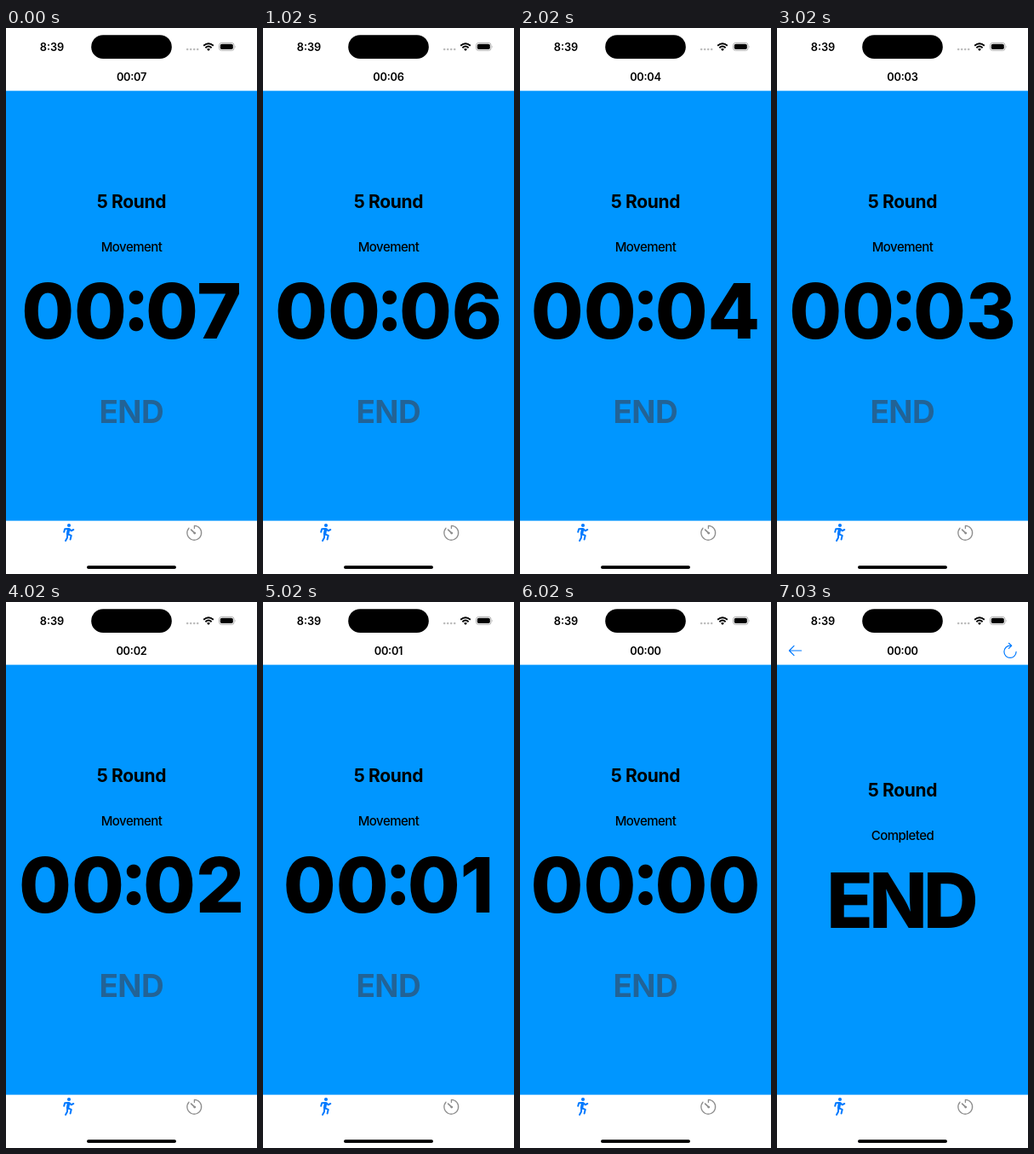
Animation of 295 by 640 pixels, one loop 8.25 s. Source, as an HTML page:

```html
<!DOCTYPE html>
<html lang="en">
<head>
<meta charset="utf-8">
<title>Round timer</title>
<style>
  html, body { margin: 0; width: 100%; height: 100%; overflow: hidden; background: #fff; }
  svg { display: block; width: 295px; height: 640px; }
  text { font-family: Inter, "Liberation Sans", sans-serif; text-anchor: middle; fill: #000; }
  .bar { font-size: 12.8px; font-weight: 600; }
  #title { letter-spacing: -.02em; font-feature-settings: "calt"; }
  .round { font-size: 21px; font-weight: 700; letter-spacing: -.016em; }
  .phase { font-size: 15px; font-weight: 500; letter-spacing: -.035em; }
  .big { font-size: 89.5px; font-weight: 800; }
  .tight { letter-spacing: -.053em; font-feature-settings: "case"; }
  .next { font-size: 37px; font-weight: 700; letter-spacing: -.015em; fill: #226396; }
  .line { fill: none; stroke-linecap: round; stroke-linejoin: round; }
  .blue { stroke: #007aff; }
</style>
</head>
<body>
<svg viewBox="0 0 295 640">
  <rect width="295" height="640" fill="#fff"/>
  <rect y="73.6" width="295" height="504" fill="#0096ff"/>

  <!-- status bar -->
  <text class="bar" x="54" y="26.6">8:39</text>
  <rect x="100.2" y="8.3" width="94.6" height="27.8" rx="13.9"/>
  <g fill="#bdbdbd">
    <circle cx="213.2" cy="25" r="1.3"/><circle cx="217.2" cy="25" r="1.3"/>
    <circle cx="221.2" cy="25" r="1.3"/><circle cx="225.2" cy="25" r="1.3"/>
  </g>
  <g class="line" stroke="#000" stroke-width="1.9" style="stroke-linecap:butt">
    <path d="M232.2 20.8Q238 15.6 243.8 20.8"/>
    <path d="M234.4 23.2Q238 20 241.6 23.2"/>
  </g>
  <path d="M236 24.8Q238 23.2 240 24.8L238 26.9Z"/>
  <rect x="250.5" y="17.4" width="17.6" height="9" rx="2.9" fill="none" stroke="#a6a6a6" stroke-width=".9"/>
  <rect x="251.8" y="18.7" width="15" height="6.4" rx="1.8"/>
  <path d="M269.3 20.4Q270.6 21.9 269.3 23.4Z" fill="#a6a6a6"/>

  <!-- navigation bar -->
  <text class="bar" id="title" x="147.5" y="61.5"></text>
  <g id="nav" class="line blue" stroke-width="1.2">
    <path d="M28.6 57H14.6M20 51.4L14.4 57L20 62.6"/>
    <path d="M275.6 51.2H274A7.1 7.1 0 1 0 281.1 58.3M272.4 48.3L275.7 51.2L272.4 54.4"/>
  </g>

  <!-- timer -->
  <g id="heading">
    <text class="round" x="147.5" y="211">5 Round</text>
    <text class="phase" id="phase" x="147.5" y="262"></text>
    <text class="big" id="big" x="147.5" y="364.3"></text>
  </g>
  <text class="next" id="next" x="147.3" y="463.3">END</text>

  <!-- tab bar -->
  <circle cx="74" cy="583" r="2.1" fill="#007aff"/>
  <g class="line blue" stroke-width="2">
    <path d="M73.5 587.6L72.6 593" stroke-width="3.4"/>
    <path d="M72.6 586.9L69.2 587.2L68.2 590.8"/>
    <path d="M74.6 587.2L76.6 589.4L79.3 588"/>
    <path d="M73 593.4L76.7 594.9L75.6 599.6"/>
    <path d="M72.2 593.6L72 597.6L70 601"/>
  </g>
  <g class="line" stroke="#8e8e8e" stroke-width="1.3">
    <path d="M221.4 586.6V583.4A8.4 8.4 0 1 1 215 586.2"/>
    <path d="M217.6 588.2L221.8 592.2" stroke-width="1.7"/>
  </g>
  <circle cx="221.7" cy="592.1" r="1.4" fill="#8e8e8e"/>
  <rect x="95" y="630.2" width="105" height="3.8" rx="1.9"/>
</svg>
<script>
const LOOP = 8250;
// [start in ms, seconds left, completed]
const STEPS = [
  [0, 7], [1020, 6], [2020, 4], [3020, 3],
  [4020, 2], [5020, 1], [6020, 0], [7030, 0, true]
];
const el = id => document.getElementById(id);
const show = (id, on) => el(id).setAttribute('visibility', on ? 'visible' : 'hidden');
const tight = text => `<tspan class="tight">${text}</tspan>`;
let current;

function render(step) {
  const [, seconds, done = false] = step;
  el('title').textContent = `00:0${seconds}`;
  el('phase').textContent = done ? 'Completed' : 'Movement';
  el('big').innerHTML = done ? `${tight('EN')}D` : `0${tight('0:')}0${seconds}`;
  el('heading').setAttribute('transform', `translate(0 ${done ? 17.3 : 0})`);
  show('next', !done);
  show('nav', done);
}

const start = performance.now();
function tick() {
  const time = (performance.now() - start) % LOOP;
  const step = STEPS.findLast(([from]) => from <= time);
  if (step !== current) render(current = step);
  requestAnimationFrame(tick);
}
tick();
</script>
</body>
</html>
```
